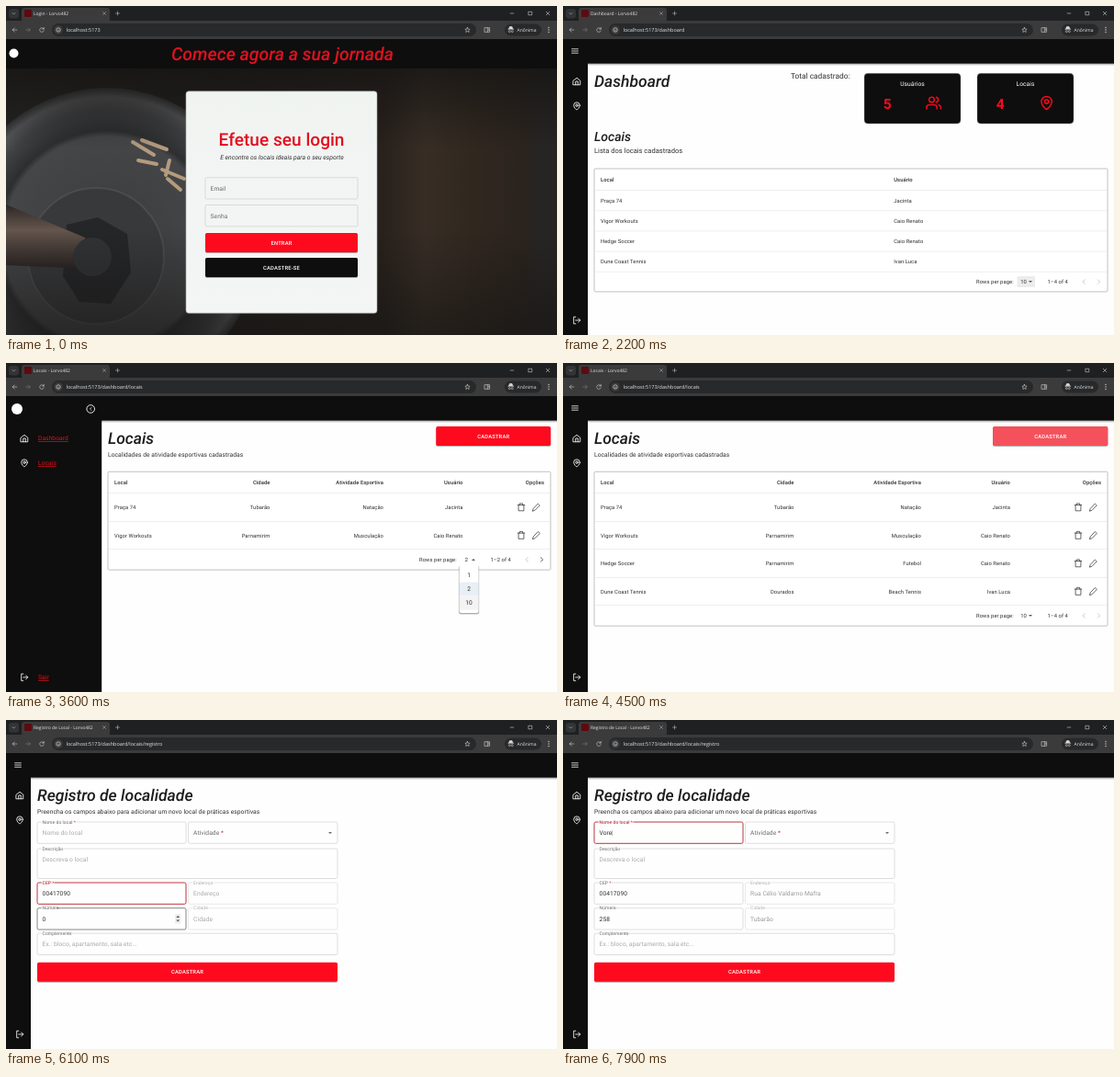
An HTML page that plays this animation: 600 by 358 pixels, repeating every 8000 ms.

```html
<!DOCTYPE html>
<html lang="pt-BR">
<head>
<meta charset="utf-8">
<title>Painel</title>
<style>
html, body { margin: 0; width: 100%; height: 100%; overflow: hidden; background: #fff; }
svg { position: absolute; left: 0; top: 0; width: 600px; height: 358px; display: block; }
text { font-family: Roboto, sans-serif; white-space: pre; text-rendering: geometricPrecision; }
.ui { font-family: "Open Sans", "Noto Sans", sans-serif; }
.mid { text-anchor: middle; }
.end { text-anchor: end; }
.cell { letter-spacing: .0107em; }
.body { letter-spacing: .0094em; }
.btn { text-anchor: middle; font-weight: 500; letter-spacing: .0286em; }
.head { font-weight: 500; font-style: italic; }
.med { font-weight: 500; }
.link { text-decoration: underline; }
</style>
</head>
<body>
<svg id="photo" viewBox="0 0 600 358">
  <defs>
    <linearGradient id="wall">
      <stop offset="0" stop-color="#252423"/><stop offset=".4" stop-color="#221e1b"/>
      <stop offset=".72" stop-color="#28211c"/><stop offset=".8" stop-color="#372d25"/>
      <stop offset=".9" stop-color="#30271f"/><stop offset="1" stop-color="#2a231e"/>
    </linearGradient>
    <linearGradient id="fade" x2="0" y2="1">
      <stop offset="0" stop-color="#151413" stop-opacity=".75"/><stop offset=".3" stop-color="#151413" stop-opacity="0"/>
      <stop offset=".6" stop-color="#151413" stop-opacity="0"/><stop offset="1" stop-color="#151413" stop-opacity=".6"/>
    </linearGradient>
    <radialGradient id="iron">
      <stop offset="0" stop-color="#3a3b3d"/><stop offset=".68" stop-color="#454648"/>
      <stop offset=".72" stop-color="#2d2e30"/><stop offset=".86" stop-color="#414244"/>
      <stop offset=".94" stop-color="#58595b"/><stop offset="1" stop-color="#343537"/>
    </radialGradient>
    <linearGradient id="bar" x2="0" y2="1">
      <stop offset="0" stop-color="#2c2725"/><stop offset=".4" stop-color="#65564e"/><stop offset="1" stop-color="#2a2422"/>
    </linearGradient>
    <linearGradient id="card" x2="0" y2="1">
      <stop offset="0" stop-color="#f0f4f1"/><stop offset="1" stop-color="#f4f5f5"/>
    </linearGradient>
  </defs>
  <rect width="570" height="358" fill="url(#wall)"/>
  <circle cx="110" cy="255" r="166" fill="url(#iron)"/>
  <circle cx="98" cy="272" r="74" fill="#38393b" stroke="#4b4c4e" stroke-width="2"/>
  <path d="M66 238l34-8 32 18 4 42-22 34-34-2-18-28z" fill="#252628"/>
  <path d="M0 216l86 36v34l-86-4z" fill="url(#bar)"/>
  <circle cx="94" cy="273" r="21" fill="#323335"/>
  <path d="M138 148l23 14M148 146l27 10M144 168l20 4M170 178l24 10M178 168l-4 16M176 188l14 12" stroke="#b39b7d" stroke-width="4" stroke-linecap="round" fill="none"/>
  <rect x="570" width="30" height="358" fill="#262524"/>
  <rect y="68" width="600" height="290" fill="url(#fade)"/>
</svg>
<svg id="stage" viewBox="0 0 600 358"></svg>
<script>
const LOOP = 8000, RED = '#fe0a1e', BLACK = '#0e0e0e', WINE = '#b3202c', INK = '#303030';
const BRAND = 'Lorvo482';
const stage = document.getElementById('stage');

const NAV = { dashboard: 1300, places: 2850, form: 4800 };
const DRAWER = { open: 2400, close: 3900 };

const PLACES = [
  ['Praça 74', 'Tubarão', 'Natação', 'Jacinta'],
  ['Vigor Workouts', 'Parnamirim', 'Musculação', 'Caio Renato'],
  ['Hedge Soccer', 'Parnamirim', 'Futebol', 'Caio Renato'],
  ['Dune Coast Tennis', 'Dourados', 'Beach Tennis', 'Ivan Luca']
];

const ICONS = {
  home: 'M3 10l9-7 9 7v11H3zM9 21v-9h6v9',
  pin: 'M20 10c0 6-8 12-8 12s-8-6-8-12a8 8 0 0116 0zM15 10a3 3 0 11-6 0 3 3 0 016 0z',
  out: 'M9 21H4V3h5M16 17l5-5-5-5M21 12H9',
  users: 'M17 21v-2a4 4 0 00-4-4H5a4 4 0 00-4 4v2M13 7a4 4 0 11-8 0 4 4 0 018 0zM23 21v-2a4 4 0 00-3-3.9M16 3.1a4 4 0 010 7.8',
  trash: 'M3 6h18M19 6v15H5V6M8 6V2h8v4',
  pencil: 'M17 3l4 4L8 20l-6 2 2-6z',
  menu: 'M3 6h18M3 12h18M3 18h18',
  prev: 'M15 6l-6 6 6 6',
  next: 'M9 6l6 6-6 6',
  down: 'M6 9l6 6 6-6',
  cross: 'M5 5l14 14M19 5L5 19',
  plus: 'M12 4v16M4 12h16',
  minus: 'M5 12h14',
  square: 'M5 5h14v14H5z',
  back: 'M20 12H4M11 5l-7 7 7 7',
  forth: 'M4 12h16M13 5l7 7-7 7',
  reload: 'M19 8a8 8 0 10.8 7M20 3v6h-6',
  star: 'M12 3l2.8 6 6.2.7-4.600 4.300 1.300 6.500-5.700-3.300-5.700 3.300 1.300-6.500L3 9.700 9.200 9z',
  panel: 'M3 4h18v16H3zM13 4v16M16 9h3M16 13h3'
};

const clamp = (v, lo = 0, hi = 1) => Math.min(hi, Math.max(lo, v));
const mix = (a, b, k) => a + (b - a) * k;
const ease = (t, start, ms) => { const k = clamp((t - start) / ms); return k * k * (3 - 2 * k); };
const within = (t, a, b) => t >= a && t < b;
const typed = (str, t, start, step) => str.slice(0, clamp(Math.floor((t - start) / step) + 1, 0, str.length));

const text = (x, y, size, str, fill = INK, cls = '', more = '') =>
  `<text x="${x}" y="${y}" font-size="${size}" fill="${fill}" class="${cls}" ${more}>${str}</text>`;
const rect = (x, y, w, h, fill, r = 0, more = '') =>
  `<rect x="${x}" y="${y}" width="${w}" height="${h}" rx="${r}" fill="${fill}" ${more}/>`;
const dot = (x, y, r, fill, more = '') => `<circle cx="${x}" cy="${y}" r="${r}" fill="${fill}" ${more}/>`;
const line = (x1, y, x2, colour) => rect(x1, y - .25, x2 - x1, .5, colour);
const arrow = (x, y, colour, up = 1) => `<path d="M${x - 2} ${y - up}h4l-2 ${2 * up}z" fill="${colour}"/>`;
const icon = (name, x, y, size, colour, width = 2) =>
  `<path transform="translate(${x - size / 2} ${y - size / 2}) scale(${size / 24})" d="${ICONS[name]}" fill="none"
    stroke="${colour}" stroke-width="${width}" stroke-linecap="round" stroke-linejoin="round"/>`;

function button(x, y, w, label, fill = RED, hover = 0) {
  return rect(x, y + .9, w, 21, '#000', 1.7, 'opacity=".3"') + rect(x, y, w, 21, fill, 1.7) +
    (hover ? rect(x, y, w, 21, '#f4515d', 1.7, `opacity="${hover}"`) : '') +
    text(x + w / 2, y + 12.5, 5.83, label, '#fff', 'btn');
}

function field(x, y, w, label, o = {}) {
  const { h = 23.3, value = '', hint = '', focus, hover, off, fill = 'none', paper = '#fff', up = 1, caret } = o;
  const edge = focus ? WINE : hover ? '#222' : off ? '#d6d6d6' : '#c2c4c4';
  const tint = focus ? WINE : off ? '#b0b0b0' : '#6b6b6b';
  const base = y + 14;
  const name = label.replace('*', `<tspan fill="#d32f2f">*</tspan>`);
  let out = rect(x, y, w, h, fill, 1.7, `stroke="${edge}" stroke-width="${focus ? .9 : .55}"`);
  if (up) out += rect(x + 4.600, y - .8, (label.length * 2.4 + 2) * up, 1.6, paper);
  out += text(x + 5.6, mix(base + .2, y + 1.7, up), mix(6.67, 5, up), name, tint, 'body');
  const bar = caret ? '<tspan dx="-.6" font-weight="300">|</tspan>' : '';
  if (value) out += text(x + 5.6, base, 6.67, value + bar, off ? '#9a9a9a' : INK, 'body');
  else if (hint) out += text(x + 5.6, base, 6.67, hint, '#a9a9a9', 'body');
  return out;
}

function browser(title, path) {
  const grey = '#d6d6d6';
  return rect(0, 0, 600, 17, '#1f2022') + rect(17, 2, 96, 15, '#3b3b3c', 3) + rect(0, 16, 600, 20, '#3b3b3c') +
    rect(3, 3, 11, 10.5, '#333436', 3) + icon('down', 8.5, 8.3, 6, grey) +
    rect(20, 4, 8, 8, '#5c0b10', 1) + text(30, 10, 4.95, `${title} - ${BRAND}`, '#e6e6e6', 'ui') +
    icon('cross', 107, 8, 5, grey) + icon('plus', 121.5, 8, 6, grey) +
    icon('minus', 551, 8, 6, '#eee') + icon('square', 571, 8, 6, '#eee') + icon('cross', 590, 8, 6, '#eee') +
    icon('back', 9.5, 26, 7, grey) + icon('forth', 24, 26, 7, '#7d7d7d') + icon('reload', 39, 26, 7, grey) +
    rect(50, 19, 462, 14, '#28292a', 7) + dot(57, 26, 4.8, '#3b3b3c') +
    dot(57, 26, 2.2, 'none', `stroke="${grey}" stroke-width=".7"`) + rect(56.7, 25.7, .7, 1.6, grey) +
    text(65.5, 28, 5.5, 'localhost:5173' + path, '#e6e6e6', 'ui') +
    icon('star', 502.5, 26, 7, grey) + icon('panel', 524, 26, 7, grey) +
    rect(543, 19.5, 40, 13, '#28292a', 6.5) +
    `<path d="M547.500 25l1-2.500h2.500l1 2.500M546.500 25.300h6.600" stroke="${grey}" stroke-width=".7" fill="${grey}"/>` +
    dot(548.300, 27.600, 1, 'none', `stroke="${grey}" stroke-width=".6"`) + dot(551.300, 27.600, 1, 'none', `stroke="${grey}" stroke-width=".6"`) +
    text(556.500, 28, 5, 'Anônima', '#e6e6e6', 'ui') +
    [23.500, 26, 28.500].map(y => dot(591, y, .65, grey)).join('');
}

function login(t) {
  const paper = '#f1f4f2', focusMail = 150, fill = 400, focusPass = 600;
  const pass = typed('••••••', t, 660, 55).length;
  let out = rect(0, 36, 600, 32, BLACK) + dot(8.500, 51.500, 5, '#fff') +
    text(301, 59, 19.5, 'Comece agora a sua jornada', '#e3101f', 'head mid') +
    rect(196, 92.800, 208, 241.400, 'url(#card)', 3, 'stroke="#a9aaaa" stroke-width=".6"') +
    text(300, 152.300, 19.1, 'Efetue seu login', '#e20f20', 'mid med') +
    text(300.500, 167, 6.8, 'E encontre os locais ideais para o seu esporte', INK, 'mid', 'font-style="italic"') +
    field(217, 186.700, 166, 'Email', {
      paper, up: ease(t, focusMail, 200), focus: within(t, focusMail, focusPass),
      fill: t >= fill ? '#e6ecf9' : 'none', value: t >= fill ? 'jacinta@exemplo.com' : ''
    }) +
    field(217, 216.500, 166, 'Senha', { paper, up: ease(t, focusPass, 200), focus: t >= focusPass });
  for (let i = 0; i < pass; i++) out += dot(223.600 + i * 2.450, 228, .85, '#222');
  return out + button(217, 247, 166, 'ENTRAR', RED, ease(t, 1020, 150)) +
    button(217, 274, 166, 'CADASTRE-SE', BLACK);
}

function shell(p) {
  const w = mix(27, 104.200, p), x = mix(15, 20, p);
  const item = (name, y, label) => icon(name, x, y, 10, '#fff') +
    (p ? text(35, y + 2.300, 6.67, label, '#e3101f', 'body link', `opacity="${p}"`) : '');
  return rect(0, 62.700, 600, .8, '#000', 0, 'opacity=".35"') + rect(0, 63.500, 600, 1.2, '#000', 0, 'opacity=".12"') +
    rect(0, 36, 600, 26.700, BLACK) + rect(0, 62, w, 296, BLACK) +
    (p < .5 ? icon('menu', 13, 49, 9, '#fff') : dot(12, 50, 6, '#fff') +
      dot(w - 12, 50, 4.300, 'none', 'stroke="#fff" stroke-width=".9"') + icon('prev', w - 12, 50, 6, '#fff', 3)) +
    item('home', 82, 'Dashboard') + item('pin', 109, 'Locais') + item('out', 342, 'Sair');
}

function pageMenu(y, show, hover) {
  if (!show) return '';
  const items = ['1', '2', '10'].map((n, i) => {
    const tint = i === 1 ? '#e9eff7' : i === hover ? '#f3f3f3' : '#fff';
    return rect(493.800, y + 9.600 + i * 15, 20.600, 15, tint) + text(504, y + 19.400 + i * 15, 6.67, n, INK, 'mid');
  });
  return `<g opacity="${show}" transform="translate(504 ${y + 6}) scale(${mix(.8, 1, show)}) translate(-504 ${-y - 6})">` +
    rect(492.800, y + 6.600, 22.600, 53, '#000', 2, 'opacity=".14"') + rect(493.300, y + 7, 21.600, 52.200, '#000', 2, 'opacity=".2"') +
    rect(493.800, y + 6, 20.600, 52, '#fff', 1.700) + items.join('') + '</g>';
}

// Columns are [x, align class]; the last cells may be icons.
function table(t, o) {
  const { x, top, head, rowH, foot, cols, titles, rows, menu, icons } = o;
  const all = t >= menu.pick, shown = all ? rows : rows.slice(0, 2);
  const base = top + head, end = base + rowH * shown.length, cy = end + foot / 2;
  const cells = (list, y, cls) => list.map((s, i) => text(cols[i][0], y, 5.83, s, INK, `cell ${cols[i][1]} ${cls}`)).join('');
  let out = rect(x, top, 593 - x, end + foot - top, '#fff', 1.2, 'stroke="#a8a8a8" stroke-width=".7"') +
    cells(titles, top + head / 2 + 1.700, 'med');
  shown.forEach((row, i) => {
    const y = base + rowH * i, c = y + rowH / 2;
    out += line(x, y, 593, '#dcdcdc') + cells(row, c + 2, '');
    if (icons) out += icon('trash', 561, c, 10, '#333', 1.8) + icon('pencil', 577.500, c, 10, '#333', 1.8);
  });
  out += line(x, end, 593, '#dcdcdc');
  const open = ease(t, menu.open, 200) - ease(t, menu.pick, 150);
  if (within(t, menu.pick, menu.blur)) out += rect(494.500, cy - 6, 19.500, 12, '#ececec', 1);
  return out + text(450, cy + 2, 5.83, 'Rows per page:', INK, 'cell') +
    text(501.500, cy + 2, 5.83, all ? '10' : '2', INK, 'mid') + arrow(509, cy, '#555', within(t, menu.open, menu.pick) ? -1 : 1) +
    text(527.500, cy + 2, 5.83, `1–${shown.length} of 4`, INK, 'cell') +
    icon('prev', 567, cy, 9, '#bbb') + icon('next', 583.500, cy, 9, all ? '#bbb' : '#222') +
    pageMenu(cy, open, t > menu.pick - 250 ? 2 : -1);
}

function dashboard(t, p) {
  const x = mix(34, 111, p), w = 593 - x, at = k => x + k * w, cw = w * .1878;
  const card = (k, title, n, name) => rect(at(k), 73.300, cw, 54.700, BLACK, 4, 'stroke="#999" stroke-width=".4"') +
    text(at(k) + cw / 2, 87.200, 6.67, title, '#fff', 'mid body') +
    text(at(k) + cw * .24, 112, 15.500, n, RED, 'mid', 'font-weight="700"') +
    icon(name, at(k) + cw * .72, 105.500, 17, RED);
  return text(x, 88, 17.500, 'Dashboard', '#1c1c1c', 'head') + text(at(.3828), 78.500, 8.330, 'Total cadastrado:') +
    card(.526, 'Usuários', '5', 'users') + card(.746, 'Locais', '4', 'pin') +
    text(x, 147, 14, 'Locais', '#1c1c1c', 'head') + text(x, 159.800, 7.550, 'Lista dos locais cadastrados') +
    table(t, {
      x, top: 177, head: 23.800, rowH: 22.080, foot: 21.800,
      cols: [[x + 7, ''], [at(.571) + 7, '']], titles: ['Local', 'Usuário'],
      rows: PLACES.map(r => [r[0], r[3]]), menu: { open: 1650, pick: 1950, blur: 2350 }
    });
}

function places(t, p) {
  const x = mix(34, 111, p);
  return text(x, 88, 17.500, 'Locais', '#1c1c1c', 'head') +
    text(x, 101.600, 6.67, 'Localidades de atividade esportivas cadastradas', INK, 'body') +
    button(468.300, 69, 124.900, 'CADASTRAR', RED, ease(t, 4250, 250)) +
    table(t, {
      x, top: 118.300, head: 23.500, rowH: 30.500, foot: 22.300, icons: true,
      cols: [[x + 7, ''], [mix(251.500, 287.500, p), 'end'], [mix(390, 411, p), 'end'], [mix(487, 497.500, p), 'end'], [586, 'end']],
      titles: ['Local', 'Cidade', 'Atividade Esportiva', 'Usuário', 'Opções'],
      rows: PLACES, menu: { open: 3250, pick: 3700, blur: 3900 }
    });
}

function form(t) {
  const zip = typed('00417090', t, 5100, 60), num = typed('258', t, 6800, 150) || '0', name = typed('Vore', t, 7550, 100);
  const found = t >= 6650, overNum = within(t, 6000, 7350), numFocus = within(t, 6400, 7400);
  const blink = key => (t - key) % 1000 < 500;
  let out = text(34, 88, 17.570, 'Registro de localidade', '#1c1c1c', 'head') +
    text(34, 101.600, 6.67, 'Preencha os campos abaixo para adicionar um novo local de práticas esportivas', INK, 'body') +
    field(34, 111, 162, 'Nome do local *', { hint: 'Nome do local', value: name, focus: t >= 7400, caret: name && blink(7850) }) +
    field(198.500, 111, 162.500, 'Atividade *', { up: 0 }) + arrow(353, 122.900, '#666') +
    field(34, 140, 327, 'Descrição', { h: 32.500, hint: 'Descreva o local' }) +
    field(34, 177, 162, 'CEP *', { hint: 'CEP', value: zip, focus: within(t, 5000, 6400), caret: t < 6400 && blink(5520) }) +
    field(198.500, 177, 162.500, 'Endereço', { off: true, hint: 'Endereço', value: found ? 'Rua Célio Valdarno Mafra' : '' }) +
    field(34, 204.700, 162, 'Número', { value: num, focus: numFocus, hover: overNum, caret: numFocus && blink(7100) }) +
    field(198.500, 204.700, 162.500, 'Cidade', { off: true, hint: 'Cidade', value: found ? 'Tubarão' : '' }) +
    field(34, 232.200, 327, 'Complemento', { hint: 'Ex.: bloco, apartamento, sala etc...' }) +
    button(34, 263.800, 327, 'CADASTRAR');
  if (overNum) out += rect(184, 211, 6.500, 10.500, '#ededed', .5) + arrow(187.200, 214, '#555', -1) + arrow(187.200, 218.500, '#555');
  return out;
}

function view(t) {
  if (t < NAV.dashboard) return browser('Login', '') + login(t);
  const p = ease(t, DRAWER.open, 225) - ease(t, DRAWER.close, 200);
  const [title, path, page] = t < NAV.places ? ['Dashboard', '/dashboard', dashboard]
    : t < NAV.form ? ['Locais', '/dashboard/locais', places]
    : ['Registro de Local', '/dashboard/locais/registro', form];
  return rect(0, 36, 600, 322, '#fefefe') + page(t, p) + shell(p) + browser(title, path);
}

let last = '';
function draw() {
  const next = view(performance.now() % LOOP);
  if (next !== last) stage.innerHTML = last = next;
  requestAnimationFrame(draw);
}
draw();
</script>
</body>
</html>
```
